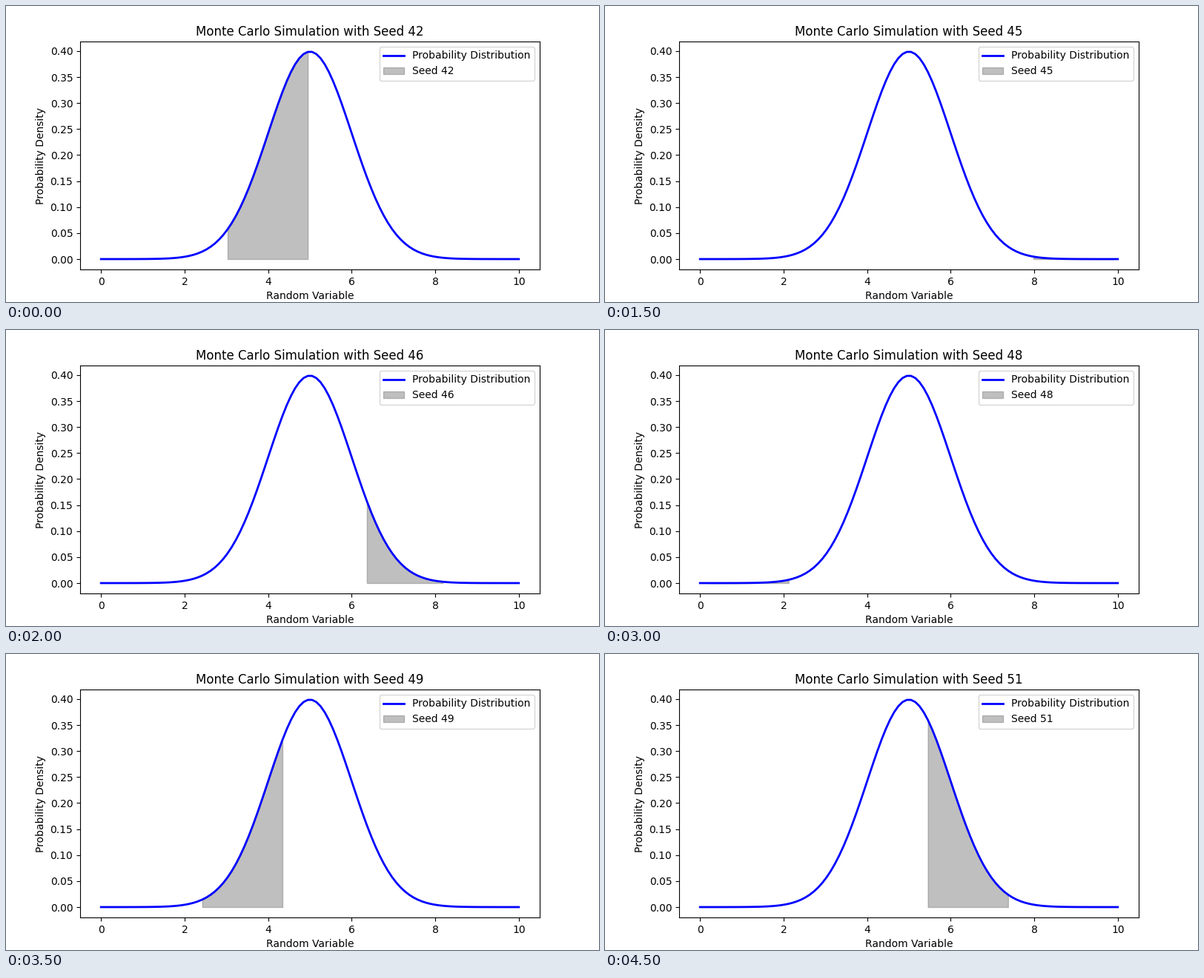
Write a matplotlib script that moves like this. It is 800 px wide and 400 px high and loops after 5000 ms.

```python
import numpy as np
import matplotlib.pyplot as plt
from matplotlib.animation import FuncAnimation

FIRST_SEED = 42
RUNS = 10
MEAN, SIGMA = 5, 1

x = np.linspace(0, 10, 100)
density = np.exp(-0.5 * ((x - MEAN) / SIGMA) ** 2) / (SIGMA * np.sqrt(2 * np.pi))

fig, ax = plt.subplots(figsize=(8, 4), dpi=100)


def draw(run):
    seed = FIRST_SEED + run
    center = np.random.RandomState(seed).uniform(1, 9)
    inside = np.abs(x - center) <= 1

    ax.clear()
    ax.plot(x, density, color="blue", lw=2, label="Probability Distribution")
    ax.fill_between(x, density, where=inside, color="gray", alpha=0.5,
                    label=f"Seed {seed}")
    ax.set_title(f"Monte Carlo Simulation with Seed {seed}")
    ax.set_xlabel("Random Variable")
    ax.set_ylabel("Probability Density")
    ax.legend(loc="upper right")
    return ax.get_children()


anim = FuncAnimation(fig, draw, frames=RUNS, interval=500, repeat=True,
                     repeat_delay=0)
plt.show()
```
